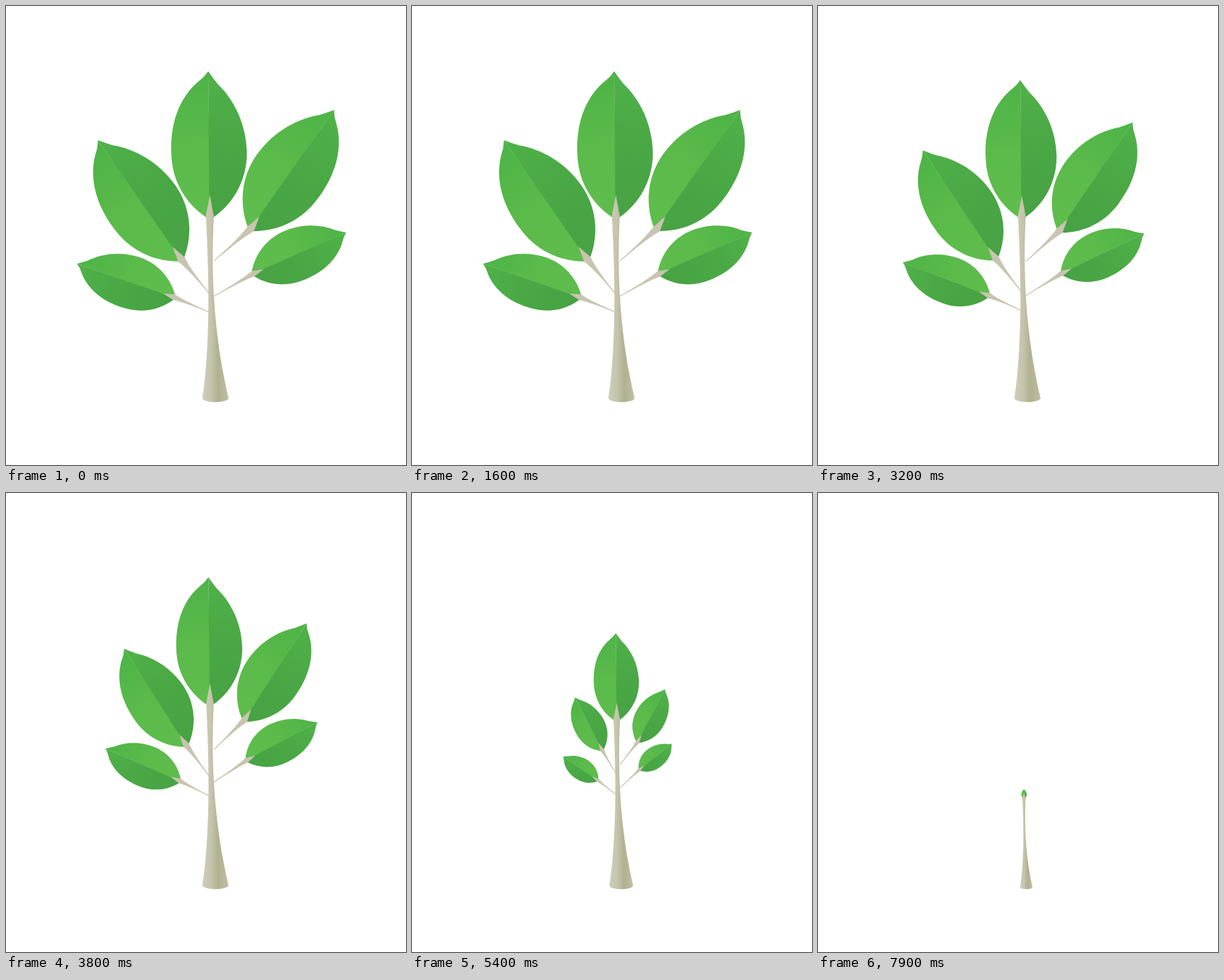
An HTML page for the animation above (8000 ms loop, 552 by 634 pixels).

```html
<!DOCTYPE html>
<html lang="en">
<head>
<meta charset="utf-8">
<title>Growing plant</title>
<style>
  html, body { margin: 0; width: 100%; height: 100%; overflow: hidden; background: #fff; }
  svg { display: block; width: 552px; height: 634px; }
</style>
</head>
<body>
<svg id="stage" viewBox="0 0 552 634">
  <defs>
    <linearGradient id="light" gradientUnits="userSpaceOnUse" x1="0" y1="0" x2="1" y2="0">
      <stop offset="0" stop-color="#5fbd4d"/><stop offset=".5" stop-color="#5aba4a"/><stop offset="1" stop-color="#4db347"/>
    </linearGradient>
    <linearGradient id="dark" gradientUnits="userSpaceOnUse" x1="0" y1="0" x2="1" y2="0">
      <stop offset="0" stop-color="#47a243"/><stop offset=".55" stop-color="#4aa845"/><stop offset="1" stop-color="#4fb248"/>
    </linearGradient>
    <linearGradient id="bark">
      <stop offset="0" stop-color="#d0cebb"/><stop offset=".35" stop-color="#c4c3ab"/>
      <stop offset=".6" stop-color="#b1b18f"/><stop offset="1" stop-color="#bfbea4"/>
    </linearGradient>
  </defs>
</svg>
<script>
const LOOP = 8000, STEP = 100;
const stage = document.getElementById('stage');

// side: -1 left, 1 right; y: height on the trunk, which climbs by rise and sinks by fall.
// Angles are degrees from upright; darkSide is the shaded half, seen along the leaf.
const branches = [
  { side: -1, darkSide: 1, y: 398, rise: 30, fall: 38, reach: 62, stemAngle: 39, length: 201, leafAngle: 35 },
  { side: 1, darkSide: 1, y: 352, rise: -9, fall: 104, reach: 67, stemAngle: 49, length: 201, leafAngle: 35 },
  { side: -1, darkSide: -1, y: 423, rise: 20, fall: 28, reach: 53, stemAngle: 67, length: 142, leafAngle: 71 },
  { side: 1, darkSide: 1, y: 401, rise: 9, fall: 68, reach: 62, stemAngle: 60, length: 141, leafAngle: 66 }
];

function make(parent, tag, attrs = {}) {
  const el = document.createElementNS('http://www.w3.org/2000/svg', tag);
  for (const key in attrs) el.setAttribute(key, attrs[key]);
  return parent.appendChild(el);
}

// Half a leaf from base (0,0) to tip (1,0); the full half bulges further toward the tip.
function halfLeaf(side, full) {
  const p = (x, y) => `${x} ${y * side}`;
  const shoulder = full
    ? `C${p(.66, .265)} ${p(.83, .19)} ${p(.93, .068)}`
    : `C${p(.63, .257)} ${p(.8, .178)} ${p(.91, .065)}`;
  return `M${p(0, -.003)}L${p(0, .025)}C${p(.1, .17)} ${p(.26, .257)} ${p(.44, .258)}` +
    `${shoulder}Q${p(.96, .026)} ${p(1, 0)}Z`;
}

function makeLeaf(fullSide, darkSide) {
  const leaf = make(stage, 'g');
  for (const side of [-1, 1]) {
    make(leaf, 'path', {
      d: halfLeaf(side, side === fullSide),
      fill: `url(#${side === darkSide ? 'dark' : 'light'})`
    });
  }
  return leaf;
}

for (const b of branches) {
  b.leaf = makeLeaf(b.side, b.darkSide);
  b.stem = make(stage, 'path', { fill: '#c8c4b1' });
}
const topLeaf = makeLeaf(-1, 1);
const trunk = make(stage, 'path', { fill: 'url(#bark)' });

const clamp = x => Math.min(1, Math.max(0, x));

// size: how grown the leaves are; drop: how far the trunk top has sunk
function poseAt(t) {
  const size = (1 + Math.cos(Math.PI * clamp((t - 1900) / 6280))) / 2;
  const drop = clamp((t - 3500) / 4400) ** 2.1;
  return { size, drop, reach: size ** .6, spread: size ** .28 };
}

function placeLeaf(leaf, tx, ty, bx, by) {
  const dx = tx - bx, dy = ty - by;
  leaf.setAttribute('transform', `matrix(${dx} ${dy} ${-dy} ${dx} ${bx} ${by})`);
}

function drawBranch(b, pose) {
  const len = b.length * pose.size;
  b.leaf.style.display = b.stem.style.display = len < 3 ? 'none' : 'inline';
  const heading = degrees => {
    const a = degrees * pose.spread * Math.PI / 180;
    return [b.side * Math.sin(a), -Math.cos(a)];
  };
  const ox = 284 + b.side * 3, oy = b.y - b.rise * (1 - pose.size) + b.fall * pose.drop;
  const [sx, sy] = heading(b.stemAngle), [ux, uy] = heading(b.leafAngle);
  const reach = b.reach * pose.reach;
  const bx = ox + sx * reach, by = oy + sy * reach;
  placeLeaf(b.leaf, bx + ux * len, by + uy * len, bx, by);

  const depth = Math.min(len * .5, len * .08 + 5), w = Math.min(len * .14, len * .022 + 1);
  const mx = bx + (ox - bx) * .3, my = by + (oy - by) * .3;
  const off = (x, y, d) => `${x - uy * d} ${y + ux * d}`;
  b.stem.setAttribute('d', `M${bx + ux * depth} ${by + uy * depth}L${off(bx, by, w)}` +
    `Q${off(mx, my, w * .15)} ${off(ox, oy, .6)}L${off(ox, oy, -.6)}` +
    `Q${off(mx, my, -w * .15)} ${off(bx, by, -w)}Z`);
}

function drawTrunk({ drop, reach }) {
  const lean = Math.sqrt(drop), thin = Math.sqrt(reach);
  const bx = 281.3 + 3 * lean, by = 292 + 131 * drop;
  placeLeaf(topLeaf, 279 + 5.5 * lean, by - 6 - 196 * reach, bx, by);

  const depth = 3 + 28 * thin, w = 1.5 + 4 * thin;
  const left = 271 + 8 * drop, right = 307 - 11 * drop, mid = (left + right) / 2, r = mid - left;
  const arc = r * .32, foot = 547.3 - arc;
  const y1 = by + (foot - by) * .43, y2 = by + (foot - by) * .755;
  trunk.setAttribute('d', `M${bx} ${by - depth}L${bx + w} ${by - 2}` +
    `C${bx - .3} ${y1} ${mid + r * .22} ${y2} ${right} ${foot}` +
    `A${r} ${arc} 0 0 1 ${left} ${foot}` +
    `C${mid - r * .5} ${y2} ${bx + .5} ${y1} ${bx - w} ${by - 2}Z`);
}

function draw(now) {
  const pose = poseAt(Math.floor(now % LOOP / STEP) * STEP);
  branches.forEach(b => drawBranch(b, pose));
  drawTrunk(pose);
}

let start;
function tick(now) {
  start ??= now;
  draw(Math.max(0, now - start));
  requestAnimationFrame(tick);
}
draw(0);
requestAnimationFrame(tick);
</script>
</body>
</html>
```
